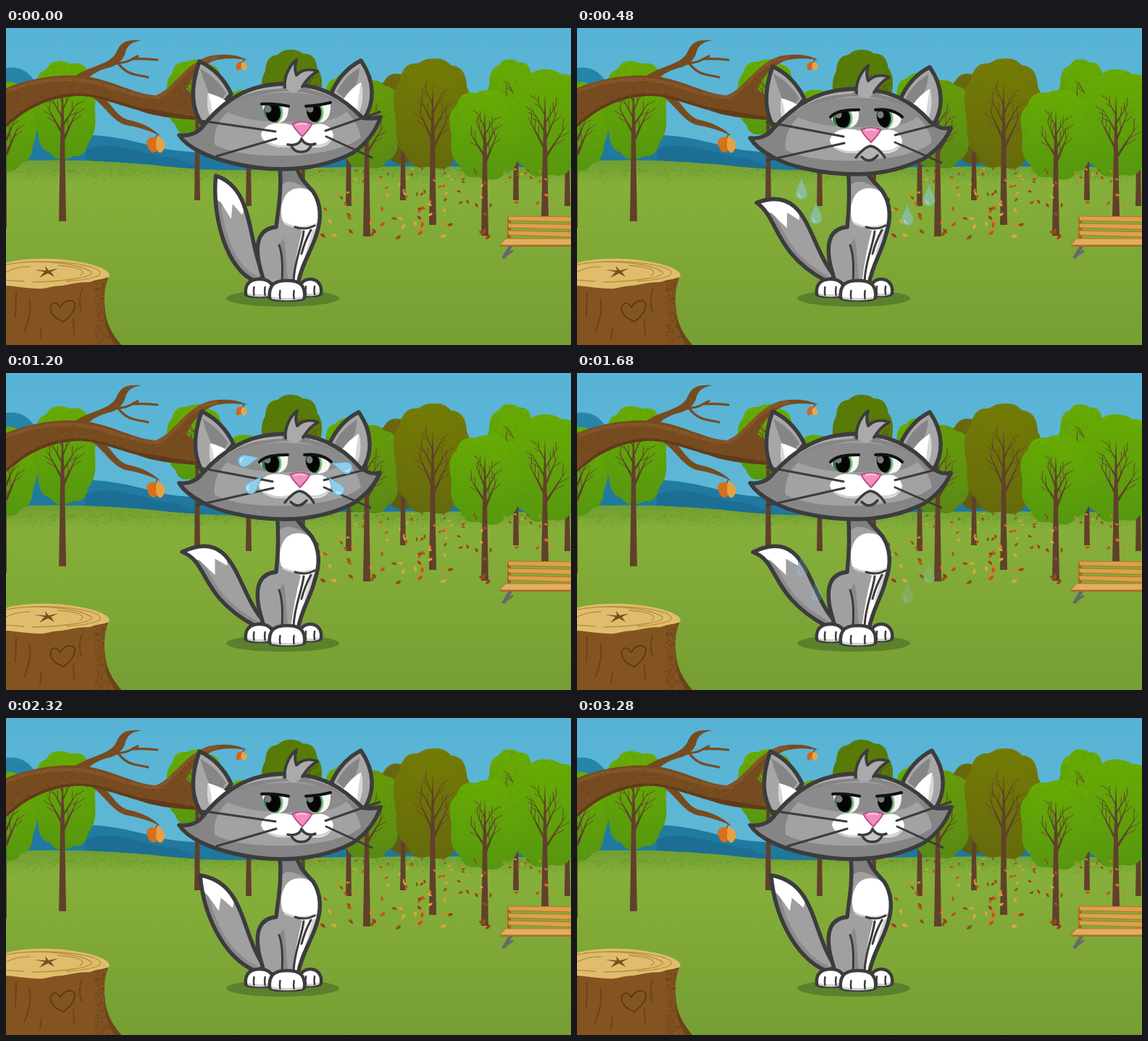
An HTML page with a canvas that plays this animation: 780x438 px, repeating every 3360 ms.

```html
<!DOCTYPE html>
<html lang="en">
<head>
<meta charset="utf-8">
<title>Cat in the park</title>
<style>
html, body { margin: 0; width: 100%; height: 100%; overflow: hidden; background: #59b4d5; }
canvas { display: block; }
</style>
</head>
<body>
<canvas id="stage" width="780" height="438"></canvas>
<script>
const stage = document.getElementById('stage').getContext('2d');
const park = document.createElement('canvas');
park.width = 780; park.height = 438;
let g = park.getContext('2d');

let seed = 7;
const rnd = () => (seed = (seed * 16807) % 2147483647) / 2147483647;
const mix = (a, b, k) => a + (b - a) * k;
const INK = '#3c3c3d', BARK = '#61402b', EDGE = 5.5;

function shape(d, fill, stroke, width = 4) {
  const p = new Path2D(d);
  if (fill) { g.fillStyle = fill; g.fill(p); }
  if (stroke) {
    g.strokeStyle = stroke; g.lineWidth = width;
    g.lineCap = g.lineJoin = 'round';
    g.stroke(p);
  }
}
const line = (d, color, width) => shape(d, null, color, width);
function oval(x, y, rx, ry, fill) {
  g.beginPath(); g.ellipse(x, y, rx, ry, 0, 0, 7);
  g.fillStyle = fill; g.fill();
}
function fade(y0, y1, a, b) {
  const grad = g.createLinearGradient(0, y0, 0, y1);
  grad.addColorStop(0, a); grad.addColorStop(1, b);
  return grad;
}
function within(d, draw) {
  g.save(); g.clip(new Path2D(d)); draw(); g.restore();
}
function moved(x, y, draw) {
  g.save(); g.translate(x, y); draw(); g.restore();
}

// ---------- park ----------
// a straight branch with short side shoots
function branch(x, y, angle, len, width) {
  const dx = Math.sin(angle) * len, dy = -Math.cos(angle) * len;
  shape(`M${x - width} ${y}L${x + dx} ${y + dy}L${x + width} ${y}Z`, BARK);
  for (let k = .35; k < .8; k += .2) {
    const a = angle + (rnd() < .5 ? -.5 : .5), l = len * .3;
    line(`M${x + dx * k} ${y + dy * k}l${Math.sin(a) * l} ${-Math.cos(a) * l}`, BARK, .9);
  }
}

function tree(x, base, left, right, top, bottom, light, dark, w = 5) {
  const cx = (left + right) / 2, cy = (top + bottom) / 2;
  const rx = (right - left) / 2, ry = (bottom - top) / 2, turn = rnd() * 3;
  const round = v => Math.sign(v) * Math.abs(v) ** .8;
  let d = '';
  for (let i = 0; i < 120; i++) {
    const a = i / 120 * 2 * Math.PI, s = round(Math.sin(a)), c = round(Math.cos(a));
    const r = .94 + .06 * Math.abs(Math.sin(a * 4.5 + turn));
    d += `${i ? 'L' : 'M'}${(cx + rx * r * c * (1 - .06 * s)).toFixed(1)} ${(cy + ry * r * s).toFixed(1)}`;
  }
  d += 'Z';
  shape(d, fade(top, bottom, light, dark));
  within(d, () => {
    for (let i = 0; i < 420; i++) {
      const a = rnd() * 6.3, r = .72 + .3 * Math.sqrt(rnd());
      g.globalAlpha = .3;
      g.fillStyle = dark;
      g.fillRect(cx + Math.cos(a) * rx * r, cy + Math.sin(a) * ry * r, 1.6, 1.6);
    }
  });
  const h = bottom - top, tip = top + h * .22;
  shape(`M${x - w} ${base}L${x - w * .6} ${bottom - h * .25}L${x} ${tip}L${x + w * .6} ${bottom - h * .25}L${x + w} ${base}Z`, BARK);
  for (let i = 0; i < 6; i++)
    branch(x, tip + h * (.2 + .08 * i), (i % 2 ? 1 : -1) * (.38 + rnd() * .2), h * (.22 + .035 * i), 1 + i * .25);
}

function drawPark() {
  g.fillStyle = fade(0, 190, '#57b3d5', '#60b7d5');
  g.fillRect(0, 0, 780, 200);
  shape('M0 55C18 52 34 60 43 80L95 148C150 146 185 160 225 168C300 178 500 180 780 178V205H0Z',
    fade(50, 200, '#2687ab', '#1f769c'));
  shape('M110 168C150 152 185 176 235 180L300 205H110Z', '#1c6e94');
  const lawn = 'M0 185C70 180 140 184 200 189C250 195 300 198 345 196C480 190 640 191 780 193V438H0Z';
  shape(lawn, fade(185, 438, '#88b23b', '#769e33'));
  shape(lawn, fade(186, 216, 'rgba(98,146,44,.6)', 'rgba(98,146,44,0)'));
  for (let i = 0; i < 900; i++) {
    const x = rnd() * 780;
    g.fillStyle = 'rgba(95,145,38,.4)';
    g.fillRect(x, 195 + rnd() * rnd() * 21, 2, 1.5);
  }

  const G = ['#68ac03', '#579710'], O = ['#747c05', '#666a0c'];
  tree(0, 276, -50, 43, 74, 198, ...G, 1);
  tree(78, 267, 38, 125, 45, 182, ...G);
  tree(264, 238, 222, 300, 43, 150, ...G, 4);
  tree(335, 246, 295, 375, 85, 170, ...G, 4);
  tree(410, 226, 353, 436, 30, 150, '#597d06', '#55750e', 3);
  tree(473, 246, 438, 512, 62, 170, ...G, 4);
  tree(548, 238, 506, 592, 62, 188, '#6c6a10', '#5f5b12', 4);
  tree(498, 288, 455, 546, 72, 195, '#669d09', '#5b8915');
  tree(589, 272, 535, 642, 42, 196, ...O);
  tree(704, 238, 664, 732, 43, 170, ...G, 4);
  tree(775, 246, 742, 820, 70, 185, ...G, 4);
  tree(744, 262, 694, 800, 57, 207, ...G);
  tree(661, 287, 612, 714, 85, 210, ...G);

  const tints = ['#c4501b', '#dda53a', '#a33d16', '#d8822a', '#8b5420'];
  for (let i = 0; i < 130; i++) {
    const y = 193 + 97 * rnd() ** 1.3, x = 420 + rnd() * 335;
    if (x > 675 && y > 245) continue;
    const s = mix(1.8, 3.6, (y - 193) / 97);
    g.save(); g.translate(x, y); g.rotate(rnd() * 3);
    shape(`M${-s * 1.2} 0Q0 ${-s * 1.5} ${s * 1.4} 0Q0 ${s} ${-s * 1.2} 0Z`, tints[i % 5]);
    g.restore();
  }
  drawBench();
  drawBranch();
  drawStump();
  oval(382, 373.5, 78, 11.5, '#5b812d');
}

function drawBench() {
  line('M698 299L692 309L688 316', '#68686a', 5);
  line('M686 317L699 308', '#68686a', 3);
  shape('M692 260H697V293H692Z', '#9a6528');
  for (let i = 0; i < 3; i++)
    shape(`M693 ${260 + i * 10}L790 ${261 + i * 10.5}V${268 + i * 10.5}L694 ${266 + i * 10}Z`, '#dfa04c', '#b6742d', 1);
  shape('M690 291H790V300H682Z', '#e3ad60', '#b6742d', 1);
  line('M683 301H790', '#a86a29', 2);
}

function drawBranch() {
  const wood = '#774b20';
  const limb = 'M-5 85C40 66 90 60 130 71C162 80 183 92 207 93C232 84 247 49 280 39C304 34 322 38 333 44C310 41 294 42 283 47C267 54 258 68 249 84L266 100V127C232 125 203 122 181 113C147 104 122 92 94 94C57 97 24 113 -5 142Z';
  shape('M91 69C120 49 146 52 154 30C160 17 172 16 187 17C172 20 167 24 164 37C160 45 155 50 145 54C128 58 118 64 112 71Z', wood);
  line('M135 55C155 45 162 51 174 43Q190 42 209 44M155 49C168 66 180 64 196 68M174 43L182 39', wood, 3.2);
  shape('M127 90C145 101 151 122 169 127C186 131 200 136 213 149C197 141 178 136 165 134C147 128 139 111 120 96Z', wood);
  shape(limb, wood);
  within(limb, () => {
    line('M-5 145C24 115 57 98 92 96C122 94 147 106 181 115L266 129', '#603b1a', 11);
    line('M-5 90C40 70 88 66 129 77C161 86 186 98 212 95C240 78 250 46 290 41', '#845529', 5);
    for (let i = 0; i < 900; i++) {
      g.fillStyle = i % 2 ? '#5d371855' : '#8f602f55';
      g.fillRect(rnd() * 270, 45 + rnd() * 90, 2, 1.5);
    }
  });
  line('M209 147L206 154M329 43L326 48', '#7b4921', 1.5);
  shape('M207 151C194 149 192 159 196 164C198 173 208 175 209 167Z', '#d5701d');
  shape('M208 150C219 151 222 164 217 169C213 177 207 169 207 163Z', '#e8a044');
  shape('M326 47C318 45 316 53 319 59L327 55Z', '#d2641b');
  shape('M326 47C334 48 335 57 328 59L324 54Z', '#e9a54b');
}

function drawStump() {
  const trunk = 'M-5 340L142 341C138 354 135 365 136 383C137 408 147 424 161 440H-5Z';
  shape(trunk, '#835420');
  within(trunk, () => {
    shape('M142 341C134 365 134 397 141 420L150 440H165V341Z', '#6c431b');
    for (let i = 0; i < 300; i++) {
      g.fillStyle = '#6c431b88';
      g.fillRect(122 + 20 * rnd(), 345 + 95 * rnd(), 1.7, 1.7);
    }
    line('M14 365L13 399M32 374Q37 390 25 421M105 361Q99 376 104 391M93 403L94 424M49 414L47 429', '#6b421a', 2);
  });
  shape('M-5 326C20 317 70 317 100 323C130 328 147 337 142 344C132 348 125 347 116 351C100 351 89 354 77 356C63 356 57 361 43 360C25 360 12 356 -5 356Z', '#dfbd6d');
  line('M-5 328C37 319 94 322 123 332C142 341 122 347 84 350M10 325C55 320 102 326 118 337C123 344 83 350 37 351M72 328C101 330 113 336 102 342M-5 348L25 350M0 337Q17 329 33 330', '#b98d40', 1.3);
  shape('M39 334L55 335L54 329L59 335L72 332L62 337L67 344L58 339L46 345L53 337Z', '#75501f');
  line('M75 386C69 375 59 381 62 391C66 402 73 402 79 406C88 400 96 390 95 381C91 374 80 376 75 386Z', '#583513', 1.6);
}

// ---------- cat ----------
// tip, right curve controls, left curve controls, then the edge of the white fur
const tails = [
  [245, 245, 320, 212, 318, 305, 268, 308, 280, 262, 254, 253, 268, 258, 289, 278, 289, 256, 306, 266, 305, 244],
  [269, 216, 332, 228, 324, 300, 300, 330, 272, 270, 271, 236, 280, 246, 294, 266, 297, 248, 313, 262, 319, 240],
  [290, 204, 345, 222, 332, 300, 306, 335, 284, 262, 287, 234, 297, 241, 311, 264, 313, 243, 326, 258, 337, 235]
];
function drawTail(x) {
  const i = x < 269 ? 0 : 1, a = tails[i], b = tails[i + 1];
  const k = (x - a[0]) / (b[0] - a[0]);
  const p = a.map((v, n) => mix(v, b[n], k));
  const [tx, ty] = p;
  const d = `M${tx} ${ty}C${p.slice(2, 6)} 358 345L343 349C${p.slice(6, 10)} ${tx} ${ty}Z`;
  shape(d, '#a0a0a1');
  within(d, () => {
    line(`M343 349C${p.slice(6, 10)} ${tx} ${ty}`, '#8b8b8c', 15);
    shape(`M${tx - 8} ${ty - 8}L${p.slice(10)}L${tx + 60} ${ty - 15}Z`, '#fff');
  });
  line(d, INK, EDGE);
}

function paw(x, y, w, h) {
  const l = x - w / 2, r = x + w / 2, b = y + h;
  shape(`M${l} ${b - 4}C${l - 2} ${y + 5} ${l + 8} ${y} ${x} ${y}C${r - 8} ${y} ${r + 2} ${y + 5} ${r} ${b - 4}C${r - 2} ${b} ${l + 2} ${b} ${l} ${b - 4}Z`, '#fff', INK, 4.5);
  line(`M${l + 4} ${b - 4}Q${x} ${b} ${r - 4} ${b - 4}`, '#d2d2d4', 3);
  for (const s of [-.2, .2]) line(`M${x + w * s} ${b - 14}Q${x + w * s - 1} ${b - 8} ${x + w * s} ${b - 3}`, INK, 2.5);
}

function drawBody(sad) {
  const n = sad ? -4 : 0;
  const d = `M${378 + n} 190C${381 + n} 225 376 248 373 275C350 277 345 295 348 318C350 332 354 341 357 354H403C408 326 421 309 ${428 + n / 2} 287C${436 + n / 2} 264 ${435 + n / 2} 243 ${424 + n / 2} 226C413 214 ${406 + n} 208 ${400 + n} 190Z`;
  shape(d, '#a0a0a1');
  within(d, () => {
    shape(`M370 190H410L418 223C400 214 390 208 ${381 + n} 217Z`, '#7f7f80');
    shape('M377 300C384 315 380 335 383 354H390C386 330 388 310 383 290Z', '#8a8a8b');
    moved(n / 2, 0, () => {
      shape('M385 233C392 219 412 218 422 227C437 245 435 264 428 272C413 280 393 276 382 267C378 253 380 242 385 233Z', '#fff');
      shape('M400 276Q415 281 432 272L426 300L404 354H395Q400 312 409 280Z', '#fff');
      line('M385 270Q407 280 430 271', '#d5d5d7', 3);
      shape('M423 279L430 275L427 294L412 318Z', '#d5d5d7');
    });
  });
  line(d, INK, EDGE);
  line('M399 275Q413 280 426 273M411 281C408 304 398 322 397 350M421 279Q412 296 408 312M377 300Q383 315 381 350', INK, 3);
  paw(350, 347, 38, 25);
  paw(420, 347, 30, 24);
  paw(388, 349, 48, 28);
}

function drawEars(sad) {
  moved(sad ? 3 : 0, sad ? 7 : 0, () => {
    shape('M273 136C255 113 254 83 267 46C286 55 301 70 311 91Z', '#a7a7a8', INK, EDGE);
    shape('M268 56C283 64 295 76 304 90L289 110Q276 83 268 56Z', '#858586');
    shape('M279 90Q276 108 282 123L308 104Q296 94 279 90Z', '#fff');
    shape('M279 90Q285 106 284 120L282 123Q276 108 279 90Z', '#d7d7d9');
  });
  moved(sad ? -3 : 0, sad ? 9 : 0, () => {
    shape('M494 126C509 104 510 74 490 45C472 54 458 70 449 90Z', '#a7a7a8', INK, EDGE);
    shape('M488 55C474 63 463 75 457 88L472 101Q487 76 488 55Z', '#858586');
    shape('M490 75Q496 99 486 119L466 98Q475 84 490 75Z', '#fff');
    shape('M490 75Q486 97 485 113L486 119Q496 99 490 75Z', '#d7d7d9');
  });
}

function drawEye(d, px, py, glintX) {
  shape(d, '#f4f7f4');
  within(d, () => {
    oval(px, py, 13.5, 16, '#82bb86');
    oval(px - 1.5, py, 12.5, 16, '#3f7a4b');
    oval(px, py, 10, 13, '#050505');
    oval(glintX, py - 5, 4.5, 5, '#777b7b');
  });
}

function drawFace(sad) {
  if (sad) {
    drawEye('M351 124Q365 111 389 114Q391 138 372 138Q354 138 351 124Z', 367, 125, 361);
    drawEye('M413 114Q437 111 448 124Q446 139 430 139Q413 138 413 114Z', 423, 125, 419);
    line('M350 123C357 115 370 113 389 113M412 113C427 111 441 115 449 123', '#111', 4);
  } else {
    drawEye('M354 107L390 107Q391 131 374 131Q355 130 354 107Z', 369, 117, 362);
    drawEye('M414 107L448 105Q449 131 430 131Q414 130 414 107Z', 425, 117, 420);
    line('M353 105Q368 104 390 108M414 108Q433 107 448 103', '#111', 4);
  }
  moved(sad ? -3 : 0, sad ? 8 : 0, () => {
    shape('M352 147C356 133 372 127 397 135L409 131L421 135C439 128 450 137 452 148C450 163 433 167 421 164L408 157L394 164C376 168 354 161 352 147Z', '#fff');
    line('M360 158Q379 167 394 162M421 162Q439 165 449 154', '#d1d1d3', 3);
    if (sad) {
      shape('M389 170Q400 156 408 156Q421 157 426 170L416 172Q406 180 396 171Z', '#b4b4b5');
      line('M388 171C395 162 403 156 408 155C416 156 423 163 428 171M396 170Q407 181 418 168', INK, 3.5);
    } else {
      shape('M395 162Q408 154 421 162Q414 173 404 171Q397 169 395 162Z', '#c7c7c8');
      line('M389 161C398 163 406 160 408 153C411 160 419 163 427 160M394 163C399 174 416 174 421 163', INK, 3.5);
    }
    shape('M396 132Q409 128 422 132Q423 135 409 150Q395 136 396 132Z', '#f08fc0', '#b94c81', 2);
    line('M402 133Q409 131 415 133', '#f8b9d8', 3);
  });
  line(sad
    ? 'M262 130L368 150M262 183L369 159M439 148L498 133M439 158L503 186'
    : 'M268 128L372 143M291 177L373 153M441 142L516 116M442 150L505 179', INK, 3);
}

function drawHead(sad) {
  const d = sad
    ? 'M239 152C252 154 264 148 270 140C300 106 335 84 385 84C435 84 466 104 488 130C500 139 508 140 516 138C508 158 492 172 478 181C445 197 415 202 385 202C335 202 290 190 270 178C255 170 245 162 239 152Z'
    : 'M239 148C252 150 264 145 270 138C300 100 335 77 385 77C435 77 466 97 492 124C502 126 510 125 517 123C508 150 490 165 478 173C445 190 410 195 380 195C330 195 285 180 270 172C255 165 245 157 239 148Z';
  drawEars(sad);
  shape(d, '#858586');
  within(d, () => moved(0, sad ? 7 : 0, () => {
    shape('M288 161C283 125 320 91 385 87C446 88 484 116 490 151C455 181 329 185 288 161Z', '#a2a2a3');
    shape('M298 112C334 82 438 82 474 112C458 128 431 132 408 129C380 132 325 130 298 112Z', '#8b8b8c');
    line('M304 105C333 84 360 84 380 82M421 84Q452 91 470 107', '#b0b0b1', 3);
  }));
  line(d, INK, EDGE);
  moved(sad ? 0 : -1, sad ? 8 : 0, () => {
    const tuft = 'M386 82C384 67 393 51 402 44C399 54 400 59 402 65C410 57 421 56 431 60C421 65 415 73 410 81';
    shape(tuft + 'Q399 96 386 82Z', '#aaaaab');
    line(tuft, INK, 4);
  });
  drawFace(sad);
}

// start x, start y, sideways drift, starting tilt
const tears = [[336, 116, -26, 1.4], [343, 150, -13, .8], [463, 125, 23, -1.3], [455, 152, 1, -.7]];
function drawTears(p) {
  const swing = Math.min(1, p * 2);
  for (const [x, y, drift, tilt] of tears) {
    g.save();
    g.globalAlpha = 1 - .85 * p;
    g.translate(x + drift * swing, y + 210 * p - 55 * p * p);
    g.rotate(tilt * (1 - swing));
    shape('M0 -15C2 -6 8 0 8 7C8 17 -8 17 -8 7C-8 0 -2 -6 0 -15Z', '#8fcfea', '#62abd0', 1);
    line('M-4 7Q-4 11 0 11', '#c9ebf7', 2);
    g.restore();
  }
}

// ---------- timing ----------
const LOOP = 3360, STEP = 80, CRY = 160, CHEER = 2320, FALL = 507;
function render(now) {
  const t = Math.floor(now % LOOP / STEP) * STEP;
  const sad = t >= CRY && t < CHEER;
  const tail = sad
    ? 243 + 25 * Math.exp((CRY - t) / 200)
    : 268 + 25 * Math.sin(2 * Math.PI * ((t + LOOP - CHEER) % LOOP) / 480);
  g.drawImage(park, 0, 0);
  drawTail(tail);
  drawBody(sad);
  drawHead(sad);
  if (sad) drawTears((t - CRY - 16 + FALL) % FALL / FALL);
}

drawPark();
g = stage;
const start = performance.now();
function tick() {
  render(performance.now() - start);
  requestAnimationFrame(tick);
}
tick();
</script>
</body>
</html>
```
